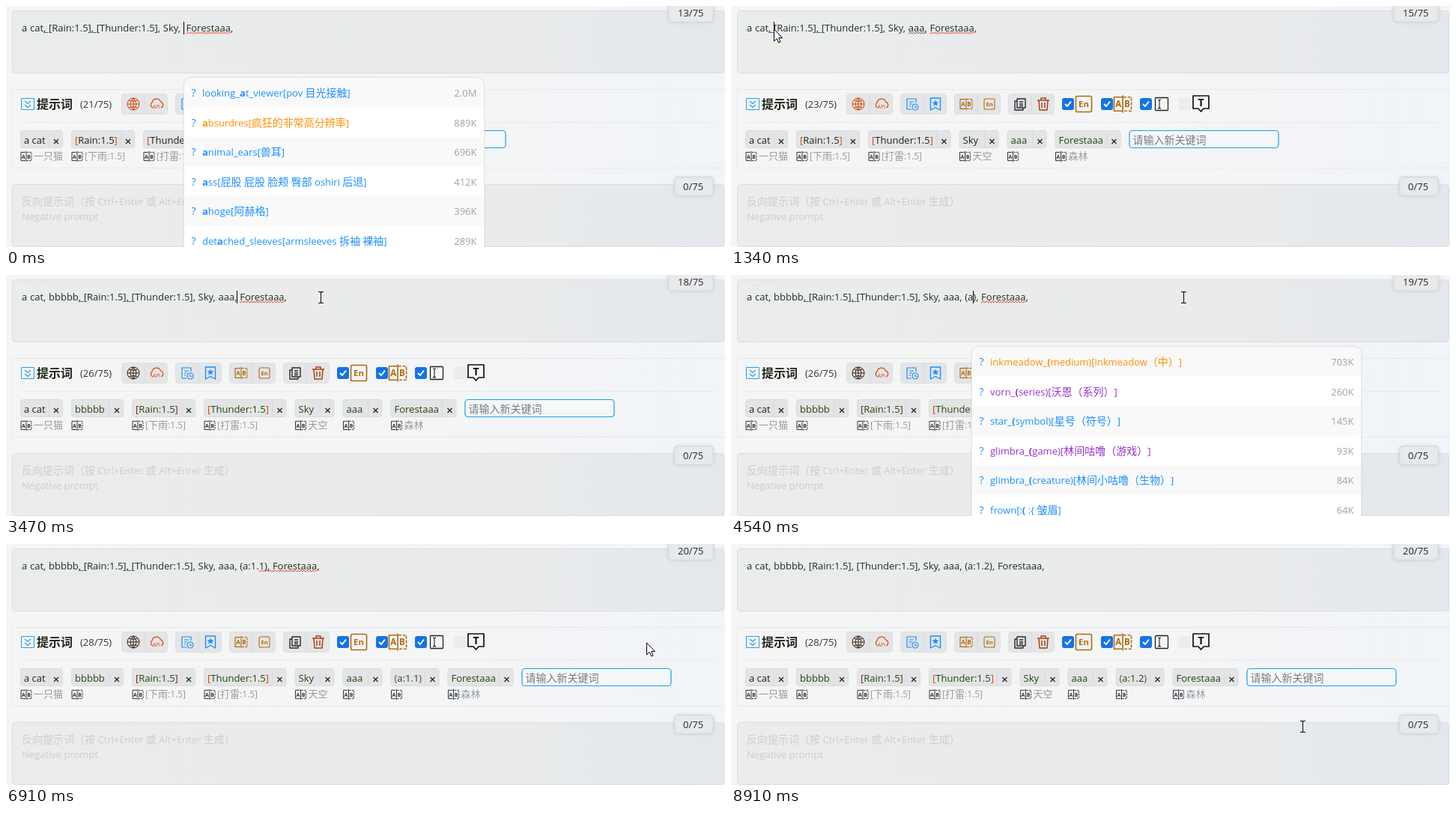
Recreate the animation shown at these times as an HTML page with a canvas. Size 960x322 px, loop 8.98 s.

```html
<!DOCTYPE html>
<html lang="zh">
<head>
<meta charset="utf-8">
<style>
  html, body { margin: 0; width: 100%; height: 100%; overflow: hidden; background: #f4f5f5; }
  canvas { display: block; }
</style>
</head>
<body>
<canvas id="stage" width="960" height="322"></canvas>
<script>
const c = document.getElementById('stage').getContext('2d');
const LOOP = 8980;
const FONT = '"Open Sans", "Noto Sans CJK SC", "Noto Sans CJK", sans-serif';
const BLUE = '#1890ff', ORANGE = '#d9480f', BROWN = '#b06a10', INK = '#1c2417', GREEN = '#1f4712', RED = '#e0483e';

// Each table holds [start time, values...]; the last started entry applies.
const at = (table, t) => table.findLast(row => row[0] <= t);

const HEAD = 'a cat, bbbbb, [Rain:1.5], [Thunder:1.5], Sky, aaa, ';
// The bar marks the caret.
const PROMPT = [
  ...['|', 'a|', 'aa|', 'aaa|', 'aaa,|'].map((s, i) =>
    [[0, 70, 270, 470, 670][i], `a cat, [Rain:1.5], [Thunder:1.5], Sky, ${s} Forestaaa,`]),
  ...['|', 'b|', 'bb|', 'bbb|', 'bbbb|', 'bbbbb|', 'bbbbb,|', 'bbbbb, |'].map((s, i) =>
    [[1340, 1430, 1570, 1710, 1850, 2000, 2200, 3070][i],
      `a cat, ${s}[Rain:1.5], [Thunder:1.5], Sky, aaa, Forestaaa,`]),
  [3270, HEAD.trimEnd() + '| Forestaaa,'],
  ...['|', '(|', '()|', '(|)', '(a|)', '(a:|)', '(a:1|)', '(a:1.|)', '(a:1.1|)', '(a:1.1)', '(a:1.2)'].map((s, i) =>
    [[4000, 4130, 4270, 4400, 4540, 5000, 5660, 5920, 6120, 6640, 8380][i], HEAD + s + ', Forestaaa,'])
];
const COUNTS = [[0, 13, 21], [870, 15, 23], [3400, 18, 26], [4470, 19, 26], [6840, 20, 28]];

// label, advance, translation, time it appears
const TAGS = [
  ['a cat', 68, '一只猫', 0], ['bbbbb', 81, '', 3400], ['[Rain:1.5]', 96, '[下雨:1.5]', 0],
  ['[Thunder:1.5]', 121.5, '[打雷:1.5]', 0], ['Sky', 64, '天空', 0], ['aaa', 64, '', 870],
  ['(a:1.1)', 76, '', 6840], ['Forestaaa', 99, '森林', 0]
];

// Asterisks mark the matched part; a leading ! or ~ sets the row colour.
const LOOK = { width: 401, rows: [
  ['looking_*a*t_viewer[pov 目光接触]', '2.0M'], ['!*a*bsurdres[疯狂的非常高分辨率]', '889K'],
  ['*a*nimal_ears[兽耳]', '696K'], ['*a*ss[屁股 屁股 脸颊 臀部 oshiri 后退]', '412K'],
  ['*a*hoge[阿赫格]', '396K'], ['det*a*ched_sleeves[armsleeves 拆袖 裸袖]', '289K']] };
const PAREN = { width: 520, rows: [
  ['!inkmeadow_*(*medium)[inkmeadow（中）]', '703K'], ['~vorn_*(*series)[沃恩（系列）]', '260K'],
  ['star_*(*symbol)[星号（符号）]', '145K'], ['~glimbra_*(*game)[林间咕噜（游戏）]', '93K'],
  ['glimbra_*(*creature)[林间小咕噜（生物）]', '84K'], ['frown[:*(* :{ 皱眉]', '64K']] };
const CAT = { width: 328, rows: [
  ['*cat*_ears[猫耳猫耳]', '185K'], ['*cat*_tail[猫尾巴]', '102K'], ['*cat*[猫猫]', '52K'],
  ['*cat*_girl[猫女]', '41K'], ['black_*cat*[黑猫（动物）]', '7.6K'], ['*cat*_cutout[猫剪影]', '4.0K']] };
const POPUP = [
  [0, 237.5, LOOK], [270, 244.5, LOOK], [470, 252.5, LOOK], [670], [4330, 321.5, PAREN], [4670, 324.5, CAT],
  [5330, 328.5, CAT], [5790, 335.5, CAT], [6120, 339.5, CAT], [6320, 346.5, CAT], [6640]
];
const MOUSE = [
  [0], [800, 880, 172, 'arrow'], [870, 830, 165, 'arrow'], [990, 737, 159, 'arrow'], [1190, 356, 176, 'arrow'],
  [1340, 57, 31, 'arrow'], [1570, 80, 40, 'beam'], [1710, 110, 48, 'beam'], [1850, 140, 53, 'beam'],
  [2000, 152, 55, 'beam'], [2800, 152, 50, 'beam'], [3070, 200, 44, 'beam'], [3200, 310, 32, 'beam'],
  [3470, 420, 30, 'beam'], [3600, 540, 30, 'beam'], [3670, 604, 30, 'beam'], [6710, 720, 80, 'beam'],
  [6840, 830, 125, 'arrow'], [6910, 855, 132, 'arrow'], [7640, 800, 155, 'arrow'], [7710, 700, 172, 'arrow'],
  [7840, 600, 178, 'arrow'], [7980, 548, 180, 'arrow'], [8840, 690, 205, 'arrow'], [8910, 763, 244, 'beam']
];

function setFont(size, weight = 400) { c.font = `${weight} ${size}px ${FONT}`; }

// Draws mixed Latin and CJK runs, *bold* parts included; returns the end x.
function text(s, x, y, color, size = 13, weight = 400) {
  c.fillStyle = color;
  for (const run of s.match(/\*[^*]+\*|[\u2e80-\uffff]+|[^*\u2e80-\uffff]+/g) || []) {
    const bold = run[0] === '*', part = bold ? run.slice(1, -1) : run;
    setFont(/[\u2e80-\uffff]/.test(part) ? size + 1 : size, bold ? 700 : weight);
    c.fillText(part, x, y);
    x += c.measureText(part).width;
  }
  return x;
}
function textRight(s, x, y, color) {
  setFont(13);
  text(s, x - c.measureText(s).width, y, color);
}
function box(x, y, w, h, r, fill, stroke, line = 1) {
  c.beginPath();
  c.roundRect(x, y, w, h, r);
  if (fill) { c.fillStyle = fill; c.fill(); }
  if (stroke) { c.strokeStyle = stroke; c.lineWidth = line; c.stroke(); }
}
function shadowBox(blur, ...args) {
  c.save();
  c.shadowColor = 'rgba(40,50,60,.1)';
  c.shadowBlur = blur;
  box(...args);
  c.restore();
}
function icon(d, x, y, color, line = 1.2, fill) {
  const path = new Path2D(d);
  c.save();
  c.translate(x, y);
  if (fill) { c.fillStyle = fill; c.fill(path); }
  c.strokeStyle = color;
  c.lineWidth = line;
  c.lineJoin = 'round';
  c.stroke(path);
  c.restore();
}
function label(s, x, y, size, color, weight = 700) {
  c.textAlign = 'center';
  text(s, x, y, color, size, weight);
  c.textAlign = 'left';
}
function translateIcon(x, y, size, color) {
  const h = size / 2;
  icon(`M-1 ${-h * .8}H${-h}V${h * .8}H-1M0 ${-h}V${h}`, x, y, color, size / 14);
  c.setLineDash([size / 6, size / 12]);
  icon(`M1 ${-h * .8}H${h}V${h * .8}H1`, x, y, color, size / 14);
  c.setLineDash([]);
  label('A', x - h * .5, y + size * .19, size * .5, color);
  label('B', x + h * .5, y + size * .19, size * .5, color);
}
function enIcon(x, y, size, color) {
  box(x - size / 2, y - size / 2, size, size, 2, null, color, size / 13);
  label('En', x, y + size * .2, size * .54, color);
}
function checkbox(x) {
  box(x - 8, 123, 16, 16, 3, '#1473e6');
  icon('M-4 0L-1 3L4 -3.5', x, 131, '#fff', 2);
}
function squiggle(x0, x1, color) {
  c.beginPath();
  for (let x = x0; x <= x1; x++) c.lineTo(x, 36 + Math.sin((x - x0) * 1.6) * 1.1);
  c.strokeStyle = color;
  c.lineWidth = 1;
  c.stroke();
}

function page(top) {
  const back = c.createLinearGradient(0, 0, 960, 0);
  back.addColorStop(0, '#f5f5f5');
  back.addColorStop(.6, '#f4f5f6');
  back.addColorStop(1, '#f1f4f8');
  c.fillStyle = back;
  c.fillRect(0, 0, 960, 322);
  const field = c.createLinearGradient(0, 0, 960, 0);
  field.addColorStop(0, '#ebecec');
  field.addColorStop(.7, '#e9ebec');
  field.addColorStop(1, '#e4e7ec');
  box(8.5, 6.5, 950, 83, 4, field, '#dbdddf');
  box(8.5, 111.5, 960, 105, 0, null, '#e6e8ea');
  box(8.5, 238.5, 950, 83, 4, field, '#dbdddf');
  c.setLineDash([3, 2]);
  icon('M19 155.5H946', 0, 0, '#e2e4e6', 1);
  c.setLineDash([]);
  text('反向提示词（按 Ctrl+Enter 或 Alt+Enter 生成）', 21, 266, '#cbcdce');
  text('Negative prompt', 21, 286, '#cbcdce');
  shadowBox(5, 884.5, -10, 60, 31.5, 5, '#e8eaec', '#d3d6d9');
  shadowBox(5, 892.5, 228.5, 52, 25, 5, '#e8eaec', '#d3d6d9');
  text(top + '/75', 897, 14, '#24282c');
  text('0/75', 904, 246, '#24282c');
}

function prompt(t) {
  const [since, marked] = at(PROMPT, t);
  const s = marked.replace('|', ''), caret = marked.indexOf('|');
  c.wordSpacing = '0.4px';
  text(s, 21, 34, '#22301b');
  setFont(13);
  const xAt = i => 21 + c.measureText(s.slice(0, i)).width;
  const under = (word, color) => {
    const i = s.indexOf(word);
    if (i >= 0) squiggle(xAt(i), xAt(i + word.length), color);
  };
  if (t < 8380) {
    for (const m of s.matchAll(/, (?=\[)/g))
      icon(`M${xAt(m.index)} 35.5H${xAt(m.index + 2)}`, 0, 0, '#3a6fc4', 1);
    under('Forestaaa', RED);
    if (t >= 870 && t < 3400) under('aaa,', t < 1430 ? '#59664f' : RED);
    if (t >= 6640) under('1), ', RED);
  }
  if (caret >= 0 && Math.floor((t - since) / 530) % 2 === 0) {
    c.fillStyle = '#000';
    c.fillRect(Math.round(xAt(caret)), 21, 1, 17);
  }
  c.wordSpacing = '0px';
}

function toolbar(t, count) {
  box(20.5, 123.5, 17, 15, 0, null, '#2a9df4');
  icon('M-4 -4L0 -.5L4 -4M-4 1L0 4.5L4 1', 29, 131, '#2a9df4');
  text('提示词', 41, 137, INK, 15, 700);
  text(`(${count}/75)`, 99, 136, '#30353a');
  for (let x = 154; x < 400; x += 72) {
    box(x + .5, 117.5, 61, 27, 4, '#e4e5e6', '#dee0e1');
    icon('M0 118V144', x + 31, 0, '#d9dbdc', 1);
  }
  icon('M-8 0A8 8 0 1 0 8 0A8 8 0 1 0 -8 0ZM-8 0H8M0 -8V8M0 -8Q-8 0 0 8Q8 0 0 -8M-6 -5Q0 -2 6 -5M-6 5Q0 2 6 5',
    170, 131, t < 2000 ? ORANGE : '#3a2015', 1);
  icon('M-5 5A4 4 0 0 1 -6 -2A6 6 0 0 1 5.5 -3A4.2 4.2 0 0 1 6 5', 201, 131, ORANGE);
  label('API', 201, 137, 6.5, ORANGE, 400);
  icon('M5 -2V-7H-7V7H-1M-4 -3H2M-4 0H0M-4 3H-2M0 4A4 4 0 1 0 8 4A4 4 0 1 0 0 4M4 2V4.5H6', 242, 131, BLUE);
  icon('M-6.5 -8H6.5V8L0 4.5L-6.5 8Z', 273, 131, BLUE, 1.4);
  icon('M0 -5L1 -2.5L4 -2.3L1.8 -.5L2.5 2.2L0 .8L-2.5 2.2L-1.8 -.5L-4 -2.3L-1 -2.5Z', 273, 131, BLUE, .4, BLUE);
  translateIcon(314, 131, 16, BROWN);
  enIcon(345, 131, 14, BROWN);
  icon('M-4 -7H7V5H-4ZM-4 -4H-7V8H4V5M-1 -3H4M-1 0H4M-1 2.5H4', 386, 131, '#25282b', 1.4);
  icon('M-8 -5H8M-3 -5V-8H3V-5M-6 -5L-5 8H5L6 -5M-2 -2V5M2 -2V5', 417, 131, '#a8420e', 1.5);
  [450, 502, 554].forEach(checkbox);
  enIcon(471, 131, 21, BROWN);
  translateIcon(523, 131, 23, BROWN);
  box(566.5, 122.5, 17, 17, 1, null, '#202326', 1.3);
  icon('M-2 -6Q0 -6 0 -4V4Q0 6 -2 6M2 -6Q0 -6 0 -4M0 4Q0 6 2 6', 572, 131, '#202326', 1.1);
  box(598.5, 123.5, 15, 15, 3, '#ededee', '#e8e9ea');
  icon('M-10 -10H11V7H4L.5 11L-3 7H-10Z', 627, 130, '#111', 1.7);
  label('T', 627.5, 134, 14, '#111');
}

function tags(t) {
  let x = 19;
  for (const [name, advance, meaning, from] of TAGS) {
    if (t < from) continue;
    const w = advance - 12, s = t >= 8380 ? name.replace('1.1', '1.2') : name;
    const ink = name.endsWith('aaa') || t >= 3400 && name !== 'a cat' ? GREEN : INK;
    box(x + .5, 166.5, w, 23, 3, '#e3e4e5', '#dbdcdd');
    icon('M0 167V189', x + w - 18, 0, '#d8dadb', 1);
    icon('M-3 -3L3 3M3 -3L-3 3', x + w - 8, 181, '#222', 1.3);
    if (/^[[(]/.test(s)) {
      const edge = t >= 2000 && s[1] === 'R' ? '#6b2d16' : s[0] === '(' ? '#6e4a2c' : ORANGE;
      let end = text(s[0], x + 5, 184, edge);
      end = text(s.slice(1, -1), end, 184, ink);
      text(s.at(-1), end, 184, edge);
    } else text(s, x + 5, 184, ink);
    translateIcon(x + 8, 201, 14, '#303438');
    text(meaning, x + 18, 205, '#979b9f', 12);
    x += advance;
  }
  box(x + .5, 166.5, 199, 23, 4, '#f6f7f8', '#18a0ee', 1.2);
  text('请输入新关键词', x + 5, 184, '#777b7f');
}

function popup(t) {
  const [, x, list] = at(POPUP, t);
  if (!list) return;
  const { width, rows } = list;
  shadowBox(2, x, 95.5, width, 250, 10, '#fff', '#e6e8ea');
  c.save();
  c.beginPath();
  c.roundRect(x + .5, 96, width - 1, 250, 10);
  c.clip();
  rows.forEach(([entry, count], i) => {
    const y = 96 + i * 39.6, base = Math.round(y + 25);
    const color = { '!': '#ff9000', '~': '#9932cc' }[entry[0]] || '#1e90ff';
    c.fillStyle = i % 2 ? '#fff' : '#f9f9fa';
    c.fillRect(x, y, width, 39.6);
    text('?', x + 10, base, '#1e90ff', 14);
    text(entry.replace(/^[!~]/, ''), x + 24.5, base, color);
    textRight(count, x + width - 10, base, '#9ca3af');
  });
  c.restore();
}

function mouse(t) {
  const [, x, y, kind] = at(MOUSE, t);
  if (kind === 'arrow') icon('M.5 0V16L4.2 12.5L6.7 18L9 17L6.6 11.6H11.5Z', x, y, '#000', 1, '#fff');
  if (kind === 'beam') icon('M-3.5 -7.5H-1L0 -6.5L1 -7.5H3.5M0 -6.5V6.5M-3.5 7.5H-1L0 6.5L1 7.5H3.5', x + .5, y, '#111', 1.1);
}

function frame() {
  const t = performance.now() % LOOP;
  const [, top, panel] = at(COUNTS, t);
  page(top);
  prompt(t);
  toolbar(t, panel);
  tags(t);
  popup(t);
  mouse(t);
  requestAnimationFrame(frame);
}
frame();
</script>
</body>
</html>
```
